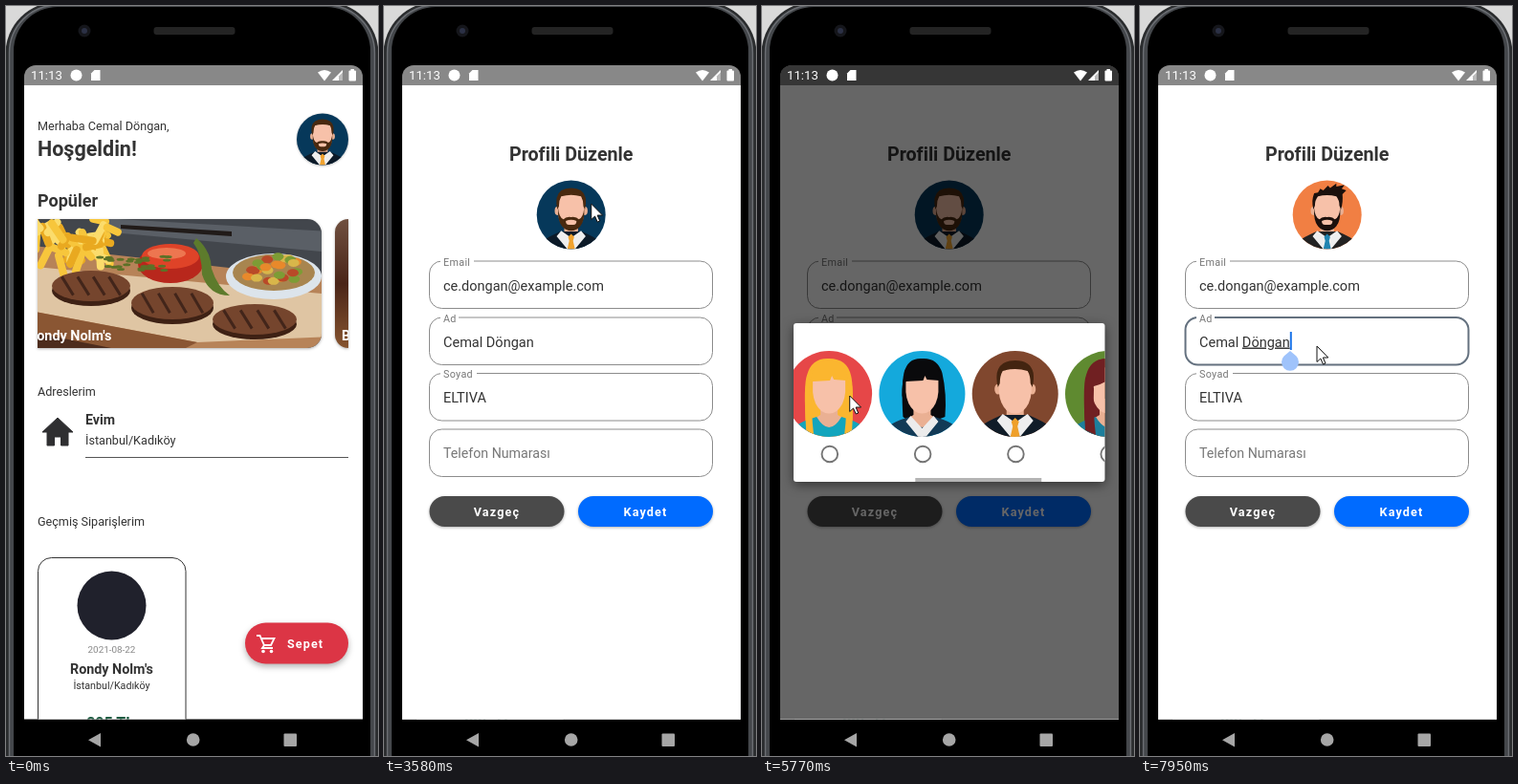
These frames come from a looping animation (389 px wide and 785 px high, 8000 ms). An HTML page:

```html
<!DOCTYPE html>
<html lang="tr">
<head>
<meta charset="utf-8">
<title>Profil</title>
<style>
html, body { margin: 0; width: 100%; height: 100%; overflow: hidden; background: #d9d9d9; }
svg { display: block; width: 389px; height: 785px; }
text { font-family: Roboto, sans-serif; fill: #333; white-space: pre; }
.b { font-weight: 700; }
.m { font-weight: 500; letter-spacing: 1.15px; }
.c { text-anchor: middle; }
.w { fill: #fff; }
.sh { filter: drop-shadow(0 1px 1.5px rgba(0,0,0,.3)); }
</style>
</head>
<body>
<svg id="stage" viewBox="0 0 389 785" xmlns="http://www.w3.org/2000/svg"></svg>
<script>
const LOOP = 8000;
const NAME = 'Cemal', MID = 'Döngan', SURNAME = 'ELTIVA', MAIL = 'ce.dongan@example.com';
const PLACE = "Rondy Nolm's", AREA = 'İstanbul/Kadıköy';
const MID_X = 195.7, BODY = 12.6, RED = '#dc3545';

const text = (x, y, size, s, attrs = '') => `<text x="${x}" y="${y}" font-size="${size}" ${attrs}>${s}</text>`;
const path = (d, fill, attrs = '') => `<path d="${d}" fill="${fill}" ${attrs}/>`;
const box = (x, y, w, h, r, fill, attrs = '') => `<rect x="${x}" y="${y}" width="${w}" height="${h}" rx="${r}" fill="${fill}" ${attrs}/>`;
const dot = (x, y, r, fill, attrs = '') => `<circle cx="${x}" cy="${y}" r="${r}" fill="${fill}" ${attrs}/>`;
const oval = (x, y, rx, ry, fill, attrs = '') => `<ellipse cx="${x}" cy="${y}" rx="${rx}" ry="${ry}" fill="${fill}" ${attrs}/>`;
const group = (attrs, ...kids) => `<g ${attrs}>${kids.join('')}</g>`;
const at = (x, y, ...kids) => group(`transform="translate(${x} ${y})"`, ...kids);

// Avatars are drawn on a disc of radius 45.
const SKIN = '#f7c1a9', SHADE = '#eab093';
const HAIR = {
  crop: 'M-18 -7Q-20 -14 -19 -22Q-16 -35 0 -35Q16 -35 19 -22Q20 -14 18 -7L16 -11Q16 -19 13 -24Q0 -28 -13 -24Q-16 -19 -16 -11Z',
  sweep: 'M-18 -8Q-21 -18 -17 -26Q-12 -38 5 -38L15 -36L13 -34L24 -29L20 -28Q21 -18 18 -8L16 -13Q16 -19 12 -25Q-2 -19 -11 -27Q-16 -20 -16 -12Z',
  spike: 'M-18 -7Q-21 -18 -17 -28L-12 -29L-9 -34L-5 -32L1 -38L4 -35L12 -41L12 -37L23 -39L19 -34L25 -32L20 -27Q21 -16 18 -7L16 -12Q16 -19 12 -24Q0 -27 -12 -24Q-16 -19 -16 -12Z'
};
const BEARD = 'M-17 -9Q-16 4 -10 6Q-7 2 0 3Q7 2 10 6Q16 4 17 -9Q18 8 12 15Q7 21 0 21Q-7 21 -12 15Q-18 8 -17 -9Z'
  + 'M-7 8Q0 5 7 8Q7 13 3 13H-3Q-7 13 -7 8Z';
const FACE = 'M-17 -22Q0 -34 17 -22V-2Q16 11 8 18Q0 23 -8 18Q-16 11 -17 -2Z';

const man = o => path('M-9 8H9V27L0 34L-9 27Z', SHADE)
  + path('M-44 45L-36 34Q-32 30 -14 22H14Q32 30 36 34L44 45Z', o.suit)
  + path('M-13 21L0 30L13 21L19 28L5 45H-5L-19 28Z', '#eee')
  + path('M-4 29L0 25L4 29L2.5 34L5 45H-5L-2.5 34Z', o.tie)
  + oval(-18, -5, 3.5, 5.5, SHADE) + oval(18, -5, 3.5, 5.5, SHADE)
  + path(FACE, SKIN) + path(HAIR[o.cut], o.hair)
  + (o.beard ? path(BEARD, o.hair, 'fill-rule="evenodd"') : '');

const BACK = {
  long: 'M-24 38Q-27 -10 -23 -20Q-18 -38 0 -37Q19 -37 23 -19Q26 -8 24 40L10 45H-18Z',
  bob: 'M-20 24Q-22 -8 -19 -22Q-15 -38 0 -37Q16 -38 21 -22Q26 0 24 24Q12 30 0 26Q-14 30 -20 24Z'
};
const FRINGE = {
  part: 'M-22 8V-20Q-18 -37 0 -37Q18 -37 22 -20V8L15 -2Q16 -13 7 -22Q0 -12 -15 -8Z',
  bangs: 'M-21 4Q-22 -35 0 -36Q22 -35 22 4L18 -14L5 -15L3 -19L1 -14L-17 -13Z'
};
// One lock of hair falling over the shoulder; side is -1 or 1.
const lock = (side, inner, color) =>
  path(`M${24 * side} 38Q${27 * side} -12 ${21 * side} -18L${inner * side} -6Q${(inner + 1) * side} 20 ${(inner - 2) * side} 43Z`, color);
const woman = o => path(BACK[o.cut], o.hair)
  + path('M-14 25L-9 22V5H9V22L14 25L8 45H-8Z', SHADE)
  + path('M-42 45L-35 34Q-30 29 -13 24Q0 46 13 24Q30 29 35 34L42 45Z', o.top)
  + (o.collar ? path('M-12 23L0 36L12 23L17 29L4 45H-4L-17 29Z', '#ececec') : '')
  + path(FACE, SKIN)
  + (o.inner ? lock(-1, o.inner, o.hair) + lock(1, o.inner, o.hair) : '')
  + path(FRINGE[o.fringe], o.hair);

const PEOPLE = [
  { draw: man, bg: '#06385a', hair: '#49290f', cut: 'crop', beard: 1, suit: '#0c1a28', tie: '#f0a22e' },
  { draw: woman, bg: '#17b0a5', hair: '#43291a', cut: 'long', fringe: 'part', inner: 15, top: '#e64b47' },
  { draw: man, bg: '#fbb233', hair: '#4a2b13', cut: 'sweep', suit: '#232323', tie: '#cf3131' },
  { draw: woman, bg: '#e64748', hair: '#fbb62f', cut: 'long', fringe: 'bangs', inner: 18, top: '#12a5bd' },
  { draw: woman, bg: '#14a9dc', hair: '#0a0a0c', cut: 'bob', fringe: 'bangs', top: '#123a56', collar: 1 },
  { draw: man, bg: '#80472e', hair: '#432410', cut: 'crop', suit: '#101c28', tie: '#efa02a' },
  { draw: woman, bg: '#5f8a30', hair: '#702022', cut: 'long', fringe: 'part', inner: 15, top: '#1d7f9c' },
  { draw: man, bg: '#f17f43', hair: '#1c100c', cut: 'spike', beard: 1, suit: '#222', tie: '#2084b0' }
];
const avatar = (i, x, y, r, attrs = '') => group(`transform="translate(${x} ${y}) scale(${r / 45})" ${attrs}`,
  dot(0, 0, 45, PEOPLE[i].bg), group('clip-path="url(#disc)"', PEOPLE[i].draw(PEOPLE[i])));

function rng(seed) {
  return () => (seed = (seed * 16807) % 2147483647) / 2147483647;
}

function meal() {
  const rnd = rng(71);
  let fries = '', veg = '', herbs = '';
  for (let i = 0; i < 44; i++) {
    const x = 26 + rnd() * 80, y = 222 + rnd() * 40, a = rnd() * 3.1, l = 12 + rnd() * 10;
    fries += `<path d="M${x} ${y}l${l * Math.cos(a)} ${l * Math.sin(a)}" stroke="${['#f7c63c', '#e9a920', '#fbdc6c'][i % 3]}" stroke-width="8" stroke-linecap="round"/>`;
  }
  for (let i = 0; i < 26; i++)
    veg += oval(248 + rnd() * 58, 261 + rnd() * 29, 6, 4, ['#7d9c35', '#e8892b', '#d8b64a', '#b94a28'][i % 4]);
  for (let i = 0; i < 30; i++)
    herbs += oval(95 + rnd() * 75, 262 + rnd() * 16, 4, 1.5, '#5c7127');
  const steak = (x, y, rx, ry) => at(x, y, oval(0, 5, rx, ry, '#3e2114'), oval(0, 0, rx, ry, '#75452d'),
    ...[-.6, -.2, .2, .6].map(k => path(`M${k * rx - 6} ${-ry * .6}l12 ${ry * 1.2}`, 'none', 'stroke="#42251a" stroke-width="3"')));
  return box(0, 222, 340, 140, 0, '#42464c')
    + path('M100 222L340 236V258L100 236Z', '#5a5f66') + path('M120 229L236 236V241L120 233Z', '#211b19')
    + path('M20 250L340 286V362H20Z', '#b78358') + path('M20 272L340 302V346L200 352L20 318Z', '#dfc5a3')
    + path('M20 318L200 352L180 362H20Z', '#8a5633') + path('M20 340L130 362H20Z', '#4d2c1d')
    + fries + oval(172, 270, 34, 20, '#b8271c') + oval(172, 262, 30, 13, '#df4328') + oval(168, 259, 20, 6, '#ed7650')
    + oval(280, 283, 50, 24, '#dce4eb') + oval(280, 279, 43, 19, '#a8854f') + veg
    + path('M199 243Q214 255 215 275Q221 294 234 303Q212 303 205 281Q205 260 196 248Z', '#5d7b2c') + herbs
    + steak(89, 293, 41, 16) + steak(174, 311, 43, 17) + steak(260, 328, 44, 16);
}

const houseRow = (x, y, right, line) => at(x, y,
  path('M21 0L37 15H32V29H24.500V20H17.500V29H10V15H5Z', '#2f2f31', 'stroke="#2f2f31" stroke-linejoin="round"'),
  text(50, 7, 14.2, 'Evim', 'class="b"'), text(50, 28, BODY, AREA),
  box(50, 41, right - x - 50, 1, 0, line));

const home = () => box(19, 83, 354, 664, 0, '#fff')
  + text(33, 130, BODY, `Merhaba ${NAME} ${MID},`) + text(33, 157, 21.5, 'Hoşgeldin!', 'class="b"')
  + avatar(0, 331, 139.5, 27, 'class="sh"') + text(33, 210, 18, 'Popüler', 'class="b"')
  + group('class="sh"', group('clip-path="url(#list)"',
    group('clip-path="url(#card)"', meal(), text(23, 350, 14.4, PLACE, 'class="b w"')),
    box(344, 223, 60, 135, 14, 'url(#cocoa)'), text(351, 350, 14.4, 'B', 'class="b w"')))
  + text(33, 408, BODY, 'Adreslerim') + houseRow(33, 431, 358, '#555')
  + text(33, 544, BODY, 'Geçmiş Siparişlerim')
  + box(33.5, 577.5, 154.5, 220, 14, '#fff', 'stroke="#333"') + dot(110.5, 627.5, 36, '#20212c')
  + text(110.5, 677, 9.9, '2021-08-22', 'class="c" style="fill:#888"')
  + text(110.5, 699, 14.3, PLACE, 'class="b c"') + text(110.5, 715, 10.7, AREA, 'class="c"')
  + text(109, 756, 16, '205 TL', 'class="b c" style="fill:#1c5a40"')
  + box(250, 645.5, 108, 43, 21.5, RED, 'style="filter:drop-shadow(0 3px 3px rgba(0,0,0,.3))"')
  + at(262, 658, path('M0 1H3.5L8 11H15L18.5 4H5M8 11L6 14H17', 'none', 'stroke="#fff" stroke-width="1.8"'),
    dot(7, 17.5, 1.8, '#fff'), dot(15.5, 17.5, 1.8, '#fff'))
  + text(294, 672, BODY, 'Sepet', 'class="b w" style="letter-spacing:1.1px"');

const wide = (y, label, color, fill = '#fff', attrs = 'stroke="#dcdcdc"') => box(47.5, y, 296.5, 32, 14, fill, attrs)
  + text(MID_X, y + 20.7, BODY, label, `class="m c" style="fill:${color}"`);

const profile = () => box(19, 83, 354, 664, 0, '#fff')
  + box(33, 112, 325, 168, 15, '#fff', 'class="sh" stroke="#eee" stroke-width=".5"')
  + avatar(0, MID_X, 162.5, 36, 'class="sh"')
  + dot(247.5, 135.5, 16, '#0a6cff') + dot(247.5, 135.5, 16, '#003a9c', 'id="press" opacity="0"')
  + path('M240 143V139.5L249 130.5L252.5 134L243.5 143ZM250 129.5L252 127.5L255.5 131L253.5 133Z', '#fff')
  + text(MID_X, 225, 18, `${NAME} ${MID} ${SURNAME}`, 'class="b c"') + text(MID_X, 248, BODY, MAIL, 'class="c"')
  + text(47.5, 320, BODY, 'Adreslerim') + box(289.5, 299.5, 54.5, 30.5, 15.2, '#17c071')
  + path('M311 314.8H322.5M316.8 309V320.5', 'none', 'stroke="#fff" stroke-width="1.6"')
  + houseRow(47, 355, 344, '#333')
  + wide(445.5, 'Geçmiş Siparişlerim', '#333') + wide(492, 'SSS', '#333') + wide(539, 'Şifre Değiştir', '#d23a42')
  + wide(586, 'Çıkış Yap', '#fff', RED, 'class="sh"');

const field = (y, label, value, w, stroke = '#8c8c8c', sw = 1) =>
  box(47.5, y, 296, 49.5, 13, '#fff', `stroke="${stroke}" stroke-width="${sw}"`)
  + (label ? box(59, y - 3, w, 6, 0, '#fff') + text(62, y + 4.5, 10.8, label, 'style="fill:#777;letter-spacing:.3px"') : '')
  + value;
const pill = (x, label, fill) => box(x, 513, 141, 32, 16, fill, 'class="sh"')
  + text(x + 70.5, 533.8, BODY, label, 'class="b c w" style="letter-spacing:1.15px"');

const edit = () => box(19, 83, 354, 664, 0, '#fff')
  + text(MID_X, 162, 19.7, 'Profili Düzenle', 'class="b c"')
  + avatar(0, MID_X, 218.5, 36, 'id="before"') + avatar(7, MID_X, 218.5, 36, 'id="after"')
  + field(267, 'Email', text(62, 298, 14.5, MAIL), 35)
  + group('id="idle"', field(326, 'Ad', text(62, 356.5, 14.5, `${NAME} ${MID}`), 19))
  + field(384.5, 'Soyad', text(62, 415, 14.5, SURNAME), 38)
  + group('id="focus"', field(326, 'Ad',
    text(62, 356.5, 14.5, `${NAME} <tspan text-decoration="underline">${MID}</tspan>`), 19, '#64717f', 2),
    box(156.8, 341, 2, 19, 0, '#1a73e8'), path('M157 361L163.5 366.5A9 9 0 1 1 150.5 366.5Z', '#9fc3fb'))
  + field(443, '', text(62, 472.5, 14.2, 'Telefon Numarası', 'style="fill:#777"'), 0)
  + pill(47.5, 'Vazgeç', '#4a4a4a') + pill(203, 'Kaydet', '#006bff');

const STEP = 97.3;
const dialog = () => box(33, 332, 325.5, 166, 3, '#fff', 'style="filter:drop-shadow(0 3px 6px rgba(0,0,0,.5))"')
  + group('clip-path="url(#sheet)"',
    group('id="row"', ...PEOPLE.map((p, i) => avatar(i, 92.5 + i * STEP, 406, 45)
      + dot(93.2 + i * STEP, 469, 8.3, '#fff', 'stroke="#757575" stroke-width="1.9"'))),
    box(33, 494, 132, 4, 0, '#b4b4b4', 'id="bar"'));

const status = () => text(26, 77, 13.2, '11:13', 'class="w"') + dot(73.5, 72.5, 6, '#fff')
  + path('M92.5 67H98.5V78H89V70.5Z', '#fff') + path('M326 69.5Q333 64.5 340 69.5L333 78.5Z', '#fff')
  + path('M352 67V78H341Z', '#fff') + path('M352 69.5V78H348V73.5Z', '#b9b9b9')
  + box(358.5, 67.5, 7.5, 11, 1, '#fff') + box(360.5, 66, 3.5, 2, 0, '#fff');

const phone = () => box(0, 0, 389, 785, 0, '#d9d9d9')
  + box(-.5, -4, 390, 900, 54, '#2a2c2e')
  + box(3.5, -1, 382, 900, 50, '#44474b', 'stroke="#6b6e73" stroke-width="1.5"') + box(8, 1, 373, 900, 46, '#000')
  + dot(82, 26, 6.5, '#15161b') + dot(82, 26, 3, '#2b3045') + box(154.5, 22, 85, 8, 3, '#242424');

const navBar = () => path('M99 761V775.5L86 768.2Z', '#a6a6a6') + dot(195.7, 768, 6.8, '#a6a6a6')
  + box(290.5, 761.5, 13.5, 13.5, 1, '#a6a6a6');

document.getElementById('stage').innerHTML = `<defs>
  <clipPath id="disc"><circle r="45"/></clipPath>
  <clipPath id="screen"><path d="M19 746.5V74A12 12 0 0 1 31 62H361A12 12 0 0 1 373 74V746.5Z"/></clipPath>
  <clipPath id="list"><rect x="33" y="218" width="325" height="146"/></clipPath>
  <clipPath id="card"><rect x="0" y="223" width="330" height="135" rx="15"/></clipPath>
  <clipPath id="sheet"><rect x="33" y="332" width="325.5" height="166" rx="3"/></clipPath>
  <linearGradient id="cocoa" x2="0" y2="1"><stop stop-color="#705040"/><stop offset=".5" stop-color="#4a2518"/><stop offset="1" stop-color="#86542f"/></linearGradient>
</defs>` + phone()
  + group('clip-path="url(#screen)"', home(), group('id="profile"', profile()), group('id="edit"', edit()),
    box(19, 62, 354, 21, 0, '#888'), box(19, 62, 354, 685, 0, '#000', 'id="dim"'), status(), group('id="dialog"', dialog()))
  + navBar()
  + path('M0 0V16.5L3.8 13L6.5 19L9 18L6.4 12H11.8Z', '#fff', 'id="cursor" stroke="#111" stroke-width="1"');

// Rows are [time, value...], joined by straight runs.
const CURSOR = [
  [130, 359, 790], [500, 345, 480], [930, 305, 178], [1080, 326, 146], [1350, 326, 146], [1590, 250, 236],
  [1790, 250, 236], [2260, 245, 123], [2750, 245, 123], [3250, 125, 330], [3600, 222, 200], [3910, 212, 222],
  [4050, 212, 222], [4350, 258, 343], [4580, 258, 343], [4780, 258, 392], [4850, 258, 392], [5170, 140, 391],
  [5250, 110, 391], [5440, 108, 392], [5600, 200, 408], [5770, 92, 408], [5850, 70, 408], [6100, 150, 412],
  [6300, 230, 410], [6400, 230, 410], [6550, 165, 408], [6800, 220, 370], [7100, 296, 467], [7400, 296, 467],
  [7780, 185, 356]
];
const SCROLL = [
  [4850, 0], [5170, 119], [5250, 149], [5370, 206], [5600, 206], [5770, 314], [5850, 336],
  [5950, 380], [6100, 410], [6400, 410], [6550, 475]
];
const BAR = [[4500, 1], [4750, 0], [4850, 0], [4880, 1], [6700, 1], [6950, 0]];
const DIM = [[4180, 0], [4440, .6], [7260, .6], [7480, 0]];
const SHEET = [[4200, 0], [4330, 1], [7260, 1], [7400, 0]];

function track(rows, t) {
  const n = rows.findIndex(r => r[0] > t);
  if (n == 0) return rows[0].slice(1);
  if (n < 0) return rows[rows.length - 1].slice(1);
  const a = rows[n - 1], b = rows[n], k = (t - a[0]) / (b[0] - a[0]);
  return a.slice(1).map((v, i) => v + (b[i + 1] - v) * k);
}

const el = id => document.getElementById(id);
const fade = (id, v) => {
  el(id).setAttribute('opacity', v);
  el(id).setAttribute('visibility', v > 0 ? 'visible' : 'hidden');
};
const move = (id, x, y) => el(id).setAttribute('transform', `translate(${x} ${y})`);

function render(t) {
  const [x, y] = track(CURSOR, t), [scroll] = track(SCROLL, t), [sheet] = track(SHEET, t);
  move('cursor', x, y);
  fade('profile', track([[1200, 0], [1420, 1]], t)[0]);
  fade('edit', track([[2700, 0], [2900, 1]], t)[0]);
  fade('press', t < 2700 ? track([[2500, 0], [2600, .5]], t)[0] : 0);
  fade('dim', track(DIM, t)[0]);
  fade('dialog', sheet);
  const s = t < 6000 ? .9 + .1 * sheet : 1;
  el('dialog').setAttribute('transform', `translate(${MID_X * (1 - s)} ${415 * (1 - s)}) scale(${s})`);
  move('row', -scroll, 0);
  move('bar', scroll * .405, 0);
  fade('bar', track(BAR, t)[0] * sheet);
  fade('before', t < 7280 ? 1 : 0);
  fade('after', t < 7280 ? 0 : 1);
  fade('idle', t < 7850 ? 1 : 0);
  fade('focus', t < 7850 ? 0 : 1);
}

const start = performance.now();
function tick() {
  render((performance.now() - start) % LOOP);
  requestAnimationFrame(tick);
}
tick();
</script>
</body>
</html>
```
